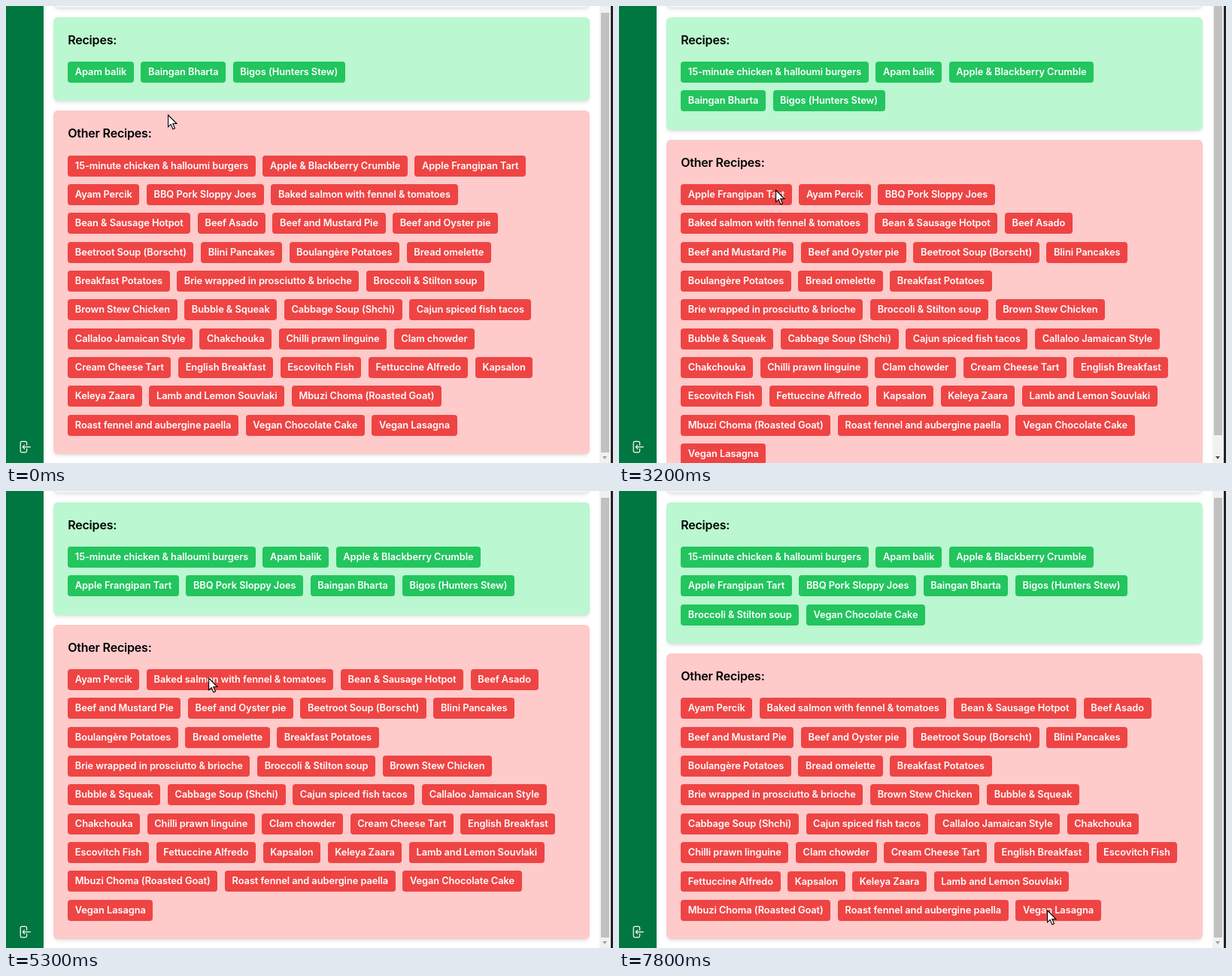
These frames come from a looping animation (807 px wide and 608 px high, 8000 ms). An HTML page:

```html
<!DOCTYPE html>
<html lang="en">
<head>
<meta charset="utf-8">
<title>Recipe picker</title>
<style>
html, body { margin: 0; width: 100%; height: 100%; overflow: hidden; background: #fff; }
body { position: relative; font-family: Inter, sans-serif; font-weight: 600; }

.side { position: absolute; left: 0; top: 0; width: 50px; height: 608px; background: #007640; }
.side svg { position: absolute; left: 15.4px; top: 577px; }
.edge { position: absolute; left: 804px; top: 0; width: 3px; height: 608px; background: #232323; }

.view { position: absolute; left: 50px; top: 0; width: 754px; height: 608px; overflow: hidden; }
.strip { animation: scenes 8s step-end infinite; }
.scene { position: relative; height: 608px; overflow: hidden; }

.panel {
  position: absolute; left: 13px; width: 713px; box-sizing: border-box;
  padding: 18.9px 0 0 19.2px; border-radius: 6px;
  box-shadow: 0 3.2px 4.8px -.8px rgba(0,0,0,.1), 0 1.6px 3.2px -1.6px rgba(0,0,0,.1);
}
.prev { top: -40px; height: 41.8px; background: #f3f4f6; }
.used { background: #bbf7d0; }
.rest { background: #fecaca; }
h2 {
  margin: 0 0 18.04px; font-size: 16px; line-height: 22.4px; font-weight: 600;
  letter-spacing: -.2px; color: #000;
}
.row { display: flex; gap: 9.6px; height: 27.8px; margin-bottom: 10.56px; }
.chip {
  flex: none; padding: 0 9.6px; border-radius: 4px; white-space: nowrap;
  font-size: 12.8px; line-height: 27.8px; letter-spacing: -.05px; color: #fff;
}
.used .chip { background: #22c55e; }
.rest .chip { background: #ef4444; }

.bar { position: absolute; left: 739px; top: 0; width: 15px; height: 608px; background: #f1f1f1; }
.thumb { position: absolute; left: 2px; top: 9px; width: 11px; height: 585px; background: #c1c1c1; }
.arrow {
  position: absolute; left: 4px; top: 599px;
  border: solid transparent; border-width: 4px 3.5px 0; border-top-color: #a0a0a0;
}
.long .thumb { top: 0; height: 571px; }
.long .arrow { border-top-color: #505050; }

.cursor { position: absolute; left: 0; top: 0; animation: pointer 8s step-end infinite; }

@keyframes scenes {
  0% { transform: translateY(0); }
  21.25% { transform: translateY(-608px); }
  40% { transform: translateY(-1216px); }
  48.75% { transform: translateY(-1824px); }
  66.25% { transform: translateY(-2432px); }
  80% { transform: translateY(-3040px); }
  97.5%, 100% { transform: translateY(-3648px); }
}
@keyframes pointer {
  0% { transform: translate(215px, 144px); }
  1.25% { transform: translate(215px, 144px); animation-timing-function: steps(6, start); }
  8.75% { transform: translate(228px, 207px); }
  40% { transform: translate(208px, 244px); }
  41.25% { transform: translate(208px, 244px); animation-timing-function: steps(2, start); }
  43.75% { transform: translate(206px, 258px); }
  52.5% { transform: translate(206px, 258px); animation-timing-function: steps(2, start); }
  55% { transform: translate(265px, 238px); }
  57.5% { transform: translate(265px, 238px); animation-timing-function: steps(3, start); }
  61.25% { transform: translate(269px, 248px); }
  67.5% { transform: translate(269px, 248px); animation-timing-function: steps(6, start); }
  75% { transform: translate(398px, 370px); }
  85% { transform: translate(398px, 370px); animation-timing-function: steps(8, start); }
  95%, 100% { transform: translate(569px, 557px); }
}
</style>
</head>
<body>
<div class="side">
  <svg width="19.2" height="19.2" viewBox="0 0 24 24" fill="none" stroke="#fff" stroke-width="1.5" stroke-linecap="round" stroke-linejoin="round">
    <path d="M15.75 9V5.25A2.25 2.25 0 0 0 13.5 3h-6a2.25 2.25 0 0 0-2.25 2.25v13.5A2.25 2.25 0 0 0 7.5 21h6a2.25 2.25 0 0 0 2.25-2.25V15M12 9l-3 3 3 3M9 12h12.75"/>
  </svg>
</div>
<div class="view"><div class="strip"></div></div>
<div class="edge"></div>
<svg class="cursor" width="14" height="22">
  <path d="M.6 1V16.8L4.2 13.4 6.9 19.8 9.5 18.7 6.8 12.5H12Z" fill="#fff" stroke="#000" stroke-width="1.1"/>
</svg>
<script>
const dishes = `15-minute chicken & halloumi burgers|Apam balik|Apple & Blackberry Crumble
Apple Frangipan Tart|Ayam Percik|BBQ Pork Sloppy Joes|Baingan Bharta
Baked salmon with fennel & tomatoes|Bean & Sausage Hotpot|Beef Asado|Beef and Mustard Pie
Beef and Oyster pie|Beetroot Soup (Borscht)|Bigos (Hunters Stew)|Blini Pancakes
Boulangère Potatoes|Bread omelette|Breakfast Potatoes|Brie wrapped in prosciutto & brioche
Broccoli & Stilton soup|Brown Stew Chicken|Bubble & Squeak|Cabbage Soup (Shchi)
Cajun spiced fish tacos|Callaloo Jamaican Style|Chakchouka|Chilli prawn linguine
Clam chowder|Cream Cheese Tart|English Breakfast|Escovitch Fish|Fettuccine Alfredo
Kapsalon|Keleya Zaara|Lamb and Lemon Souvlaki|Mbuzi Choma (Roasted Goat)
Roast fennel and aubergine paella|Vegan Chocolate Cake|Vegan Lasagna`.split(/[|\n]/);

// Each scene: dish just picked, chips per row in the upper and lower panel.
const scenes = [
  ['', '3', '3344344533'],
  ['15-minute', '4', '4343345531'],
  ['Apple & B', '32', '3343345531'],
  ['Apple F', '33', '344344533'],
  ['BBQ', '34', '443345531'],
  ['Broccoli', '341', '443345431'],
  ['Vegan Ch', '342', '44334543'],
];
const picked = new Set(dishes.filter(d => /^(Apam|Baingan|Bigos)/.test(d)));
const pitch = 38.36, frame = 73.34, gap = 13;

function add(parent, cls, text = '', tag = 'div') {
  const el = document.createElement(tag);
  el.className = cls;
  el.textContent = text;
  return parent.appendChild(el);
}

function addPanel(scene, cls, title, top, names, counts) {
  const panel = add(scene, 'panel ' + cls);
  const height = frame + pitch * counts.length;
  panel.style.top = top + 'px';
  panel.style.height = height + 'px';
  add(panel, '', title, 'h2');
  let next = 0;
  for (const n of counts) {
    const row = add(panel, 'row');
    for (const name of names.slice(next, next += +n)) add(row, 'chip', name);
  }
  return top + height + gap;
}

const strip = document.querySelector('.strip');
for (const [pick, upper, lower] of scenes) {
  if (pick) picked.add(dishes.find(d => d.startsWith(pick)));
  const long = upper.length + lower.length > 11;
  const scene = add(strip, long ? 'scene long' : 'scene');
  add(scene, 'panel prev');
  const top = addPanel(scene, 'used', 'Recipes:', 14.7, dishes.filter(d => picked.has(d)), upper);
  addPanel(scene, 'rest', 'Other Recipes:', top, dishes.filter(d => !picked.has(d)), lower);
  const bar = add(scene, 'bar');
  add(bar, 'thumb');
  add(bar, 'arrow');
}
</script>
</body>
</html>
```
